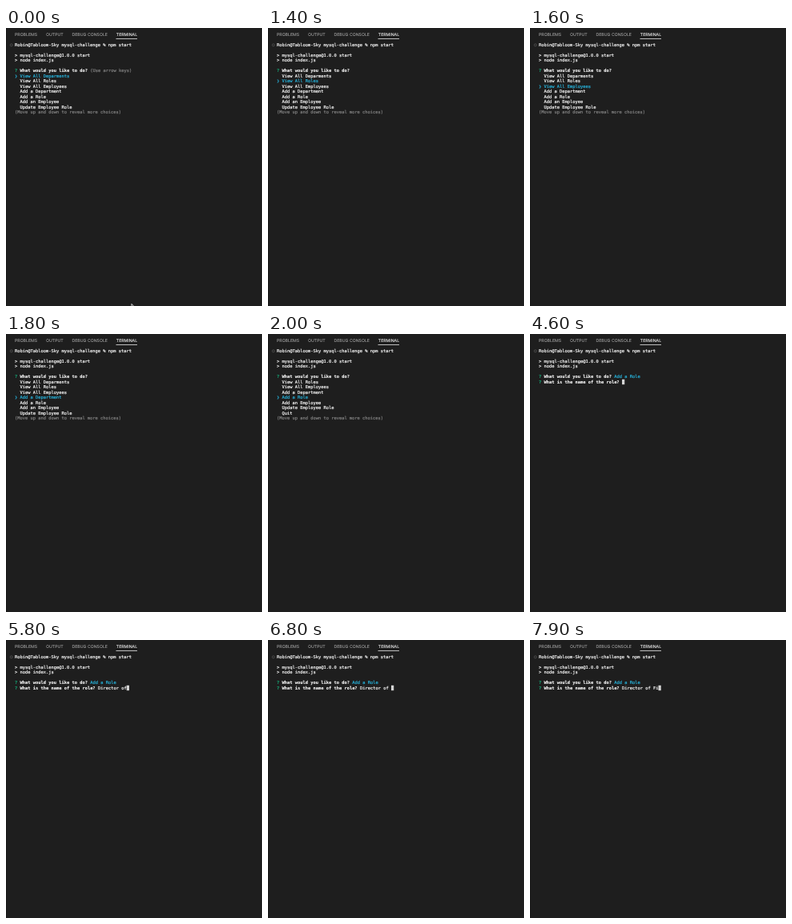
An HTML page for the animation above (8000 ms loop, 320 px wide and 348 px high).

```html
<!DOCTYPE html>
<html lang="en">
<head>
<meta charset="utf-8">
<title>Terminal prompt</title>
<style>
  html, body { margin: 0; width: 100%; height: 100%; overflow: hidden; background: #1e1e1e; }
  svg { display: block; width: 320px; height: 348px; }
  text { white-space: pre; text-rendering: geometricPrecision; fill: currentColor; stroke: currentColor; }
  #tabs { font: 5.2px Inter, Roboto, sans-serif; color: #a2a2a2; stroke-width: .08; }
  #tabs text { stroke-width: .08; }
  #tabs .on { color: #f4f4f4; }
  #term { font: 5.4px "DejaVu Sans Mono", "Liberation Mono", monospace; color: #f4f4f4; }
  #term text { stroke-width: .2; }
  #term .bold { font-weight: 700; color: #fff; stroke-width: .08; }
  #term .green { color: #14b57e; }
  #term .cyan { color: #27b0d8; }
  #term .dim { color: #7f7f7f; }
</style>
</head>
<body>
<svg viewBox="0 0 320 348">
  <rect width="320" height="348" fill="#1e1e1e"/>
  <rect width="1" height="348" fill="#171717"/>
  <g id="tabs">
    <text x="11" y="9.8">PROBLEMS</text>
    <text x="50" y="9.8">OUTPUT</text>
    <text x="82.5" y="9.8">DEBUG CONSOLE</text>
    <text x="137.8" y="9.8" class="on">TERMINAL</text>
    <rect x="137.5" y="13" width="26.5" height=".8" fill="#e7e7e7"/>
  </g>
  <circle cx="6.7" cy="21.3" r="1.5" fill="none" stroke="#666" stroke-width=".6"/>
  <g id="term"></g>
  <rect id="caret" y="56.8" width="3.25" height="6.4" fill="#d4d4d4"/>
  <path id="mouse" d="M0 0V4.2L1 3.3L2.9 3.1Z" fill="#111" stroke="#fff" stroke-width=".8"/>
</svg>
<script>
const LOOP = 8000, LEFT = 11, CHAR = 3.25, LINE = 6.5, BASE = 22.8;
const choices = ["View All Deparments", "View All Roles", "View All Employees",
  "Add a Department", "Add a Role", "Add an Employee", "Update Employee Role", "Quit"];
const downKeys = [1400, 1600, 1800, 2000];
const ENTER = 3600, PAGE = 7, INPUT_COL = 32;
const term = document.getElementById("term");
const caret = document.getElementById("caret");
const mouse = document.getElementById("mouse");

function put(row, col, str, cls = "") {
  const el = document.createElementNS("http://www.w3.org/2000/svg", "text");
  el.setAttribute("x", LEFT + col * CHAR);
  el.setAttribute("y", BASE + row * LINE);
  el.setAttribute("class", cls);
  el.textContent = str;
  term.append(el);
}

function question(row, str) {
  put(row, 0, "?", "green");
  put(row, 2, str, "bold");
}

function typed(t) {
  const full = "Director of Fin";
  let n = 0;
  if (t >= 5000) n = Math.min(11, Math.ceil(((t - 5000) / 100 + 1) * 11 / 9));
  if (t >= 6600) n = 12;
  if (t >= 7000) n = 14;
  if (t >= 7200) n = 15;
  if (t >= 7600) n = 14; // backspace
  return full.slice(0, n);
}

function menu(t) {
  const picked = downKeys.filter(k => t >= k).length;
  const top = Math.max(0, picked - 3);
  if (!picked) put(5, 29, "(Use arrow keys)", "dim");
  choices.slice(top, top + PAGE).forEach((label, i) => {
    const on = top + i === picked;
    if (on) put(6 + i, 0, "❯", "cyan");
    put(6 + i, 2, label, on ? "cyan" : "");
  });
  put(6 + PAGE, 0, "(Move up and down to reveal more choices)", "dim");
}

function draw(t) {
  term.replaceChildren();
  put(0, 0, "Robin@Tabloom-Sky mysql-challenge % npm start");
  put(2, 0, "> mysql-challenge@1.0.0 start");
  put(3, 0, "> node index.js");
  question(5, "What would you like to do?");

  const asking = t >= ENTER;
  if (asking) {
    const answer = typed(t);
    put(5, 29, "Add a Role", "cyan");
    question(6, "What is the name of the role?");
    put(6, INPUT_COL, answer);
    caret.setAttribute("x", LEFT + (INPUT_COL + answer.length) * CHAR);
  } else {
    menu(t);
  }
  caret.style.display = asking ? "" : "none";

  mouse.style.display = t < 300 ? "" : "none";
  mouse.setAttribute("transform", `translate(157 ${345.4 + t / 120})`);
}

const start = performance.now();
let last = -1;
function tick() {
  const t = Math.floor((performance.now() - start) % LOOP / 100) * 100;
  if (t !== last) draw(last = t);
  requestAnimationFrame(tick);
}
tick();
</script>
</body>
</html>
```
